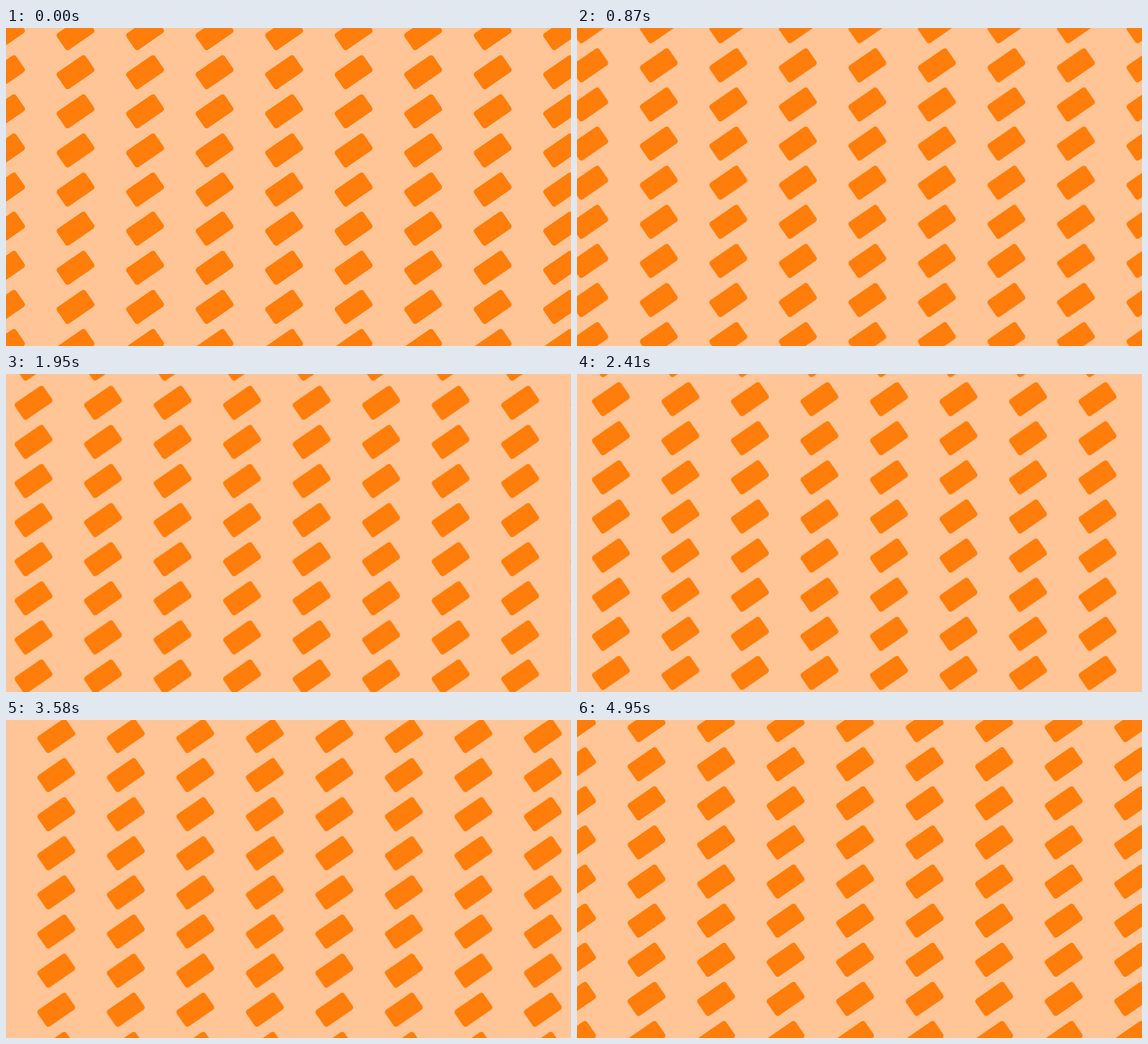
Recreate the animation shown at these times as an HTML page. Size 998 by 561 pixels, loop 5.05 s.

```html
<!DOCTYPE html>
<html lang="en">
<head>
<meta charset="utf-8">
<title>Drifting blocks</title>
<style>
  html, body {
    margin: 0;
    width: 100%;
    height: 100%;
    overflow: hidden;
    background: #ffc596;
  }
  svg { display: block; width: 998px; height: 561px; }

  /* 119 steps at 24 per second, then a short hold; one cycle moves one cell right and one up */
  #blocks {
    fill: #ff7d0a;
    animation: drift 5050ms -9ms infinite;
  }
  @keyframes drift {
    0% { transform: translate(0, 0); animation-timing-function: steps(119, end); }
    98.185%, 100% { transform: translate(122.8px, -69px); }
  }
</style>
</head>
<body>
<svg viewBox="0 0 998 561"><g id="blocks"></g></svg>
<script>
  const CELL = { w: 122.8, h: 69 };
  const BLOCK = { w: 61.6, h: 35.3, r: 5, tilt: -34.5 };
  const TOP = 78;
  const blocks = document.getElementById('blocks');

  function addBlock(x, y) {
    const rect = document.createElementNS('http://www.w3.org/2000/svg', 'rect');
    const attrs = {
      x: -BLOCK.w / 2,
      y: -BLOCK.h / 2,
      width: BLOCK.w,
      height: BLOCK.h,
      rx: BLOCK.r,
      transform: `translate(${x} ${y}) rotate(${BLOCK.tilt})`
    };
    for (const name in attrs) rect.setAttribute(name, attrs[name]);
    blocks.append(rect);
  }

  // One spare column and row on each side cover the drift.
  for (let col = -1; col <= 8; col++) {
    for (let row = -1; row <= 8; row++) {
      addBlock(col * CELL.w, TOP + row * CELL.h);
    }
  }
</script>
</body>
</html>
```
